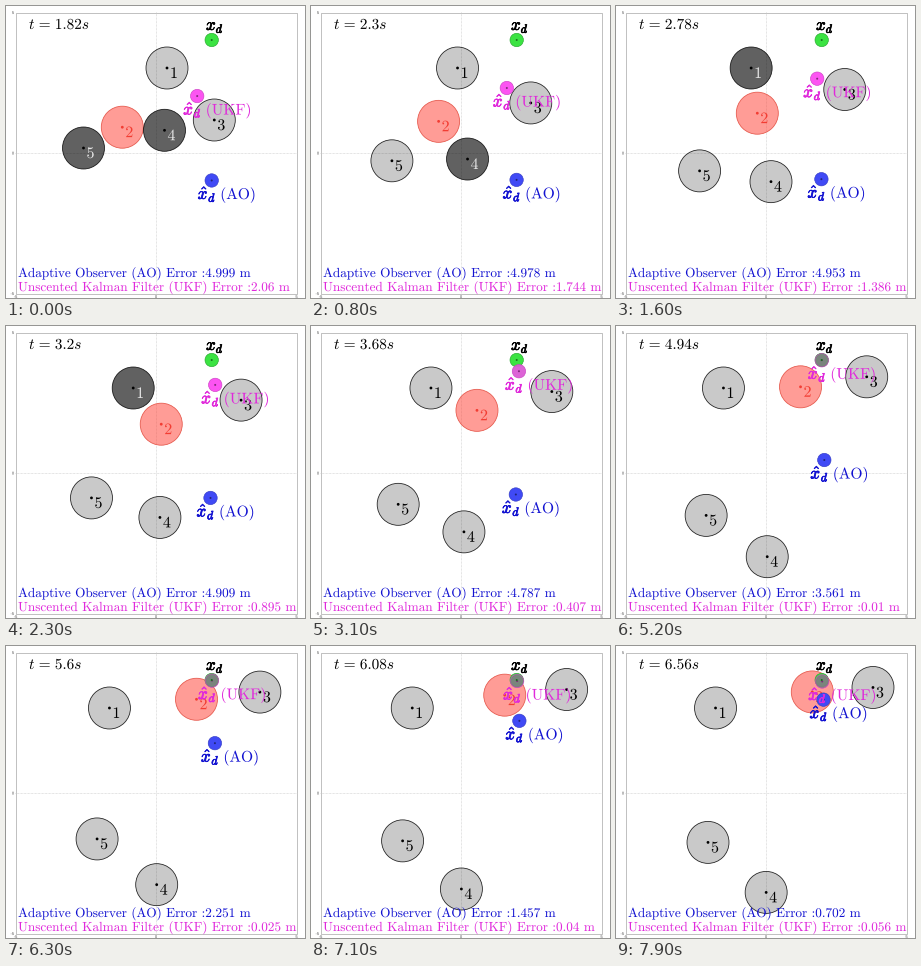
Recreate the animation shown at these times as a matplotlib script. Size 299 by 292 pixels, loop 8000 ms.

```python
import numpy as np
import matplotlib.pyplot as plt
from matplotlib.animation import FuncAnimation
from matplotlib.patches import Circle, Rectangle
from matplotlib.patheffects import Normal, withStroke

W, H, DPI = 299, 292, 64
PT = 72 / DPI            # points per pixel
UNIT = 28.1              # pixels per metre
RATE = 0.03              # approach rate per step
FRAMES = 80
TARGET = np.array([205.7, 34.0])
SENSE = 51               # avoidance range in pixels

GREEN, BLUE, MAGENTA = (0.23, 0.89, 0.26), (0.25, 0.29, 0.96), (0.99, 0.33, 0.95)
BLUE_INK, MAGENTA_INK, RED = (0.07, 0.07, 0.82), (0.88, 0.16, 0.86), (0.95, 0.24, 0.2)

plt.rcParams["mathtext.fontset"] = "cm"
fig = plt.figure(figsize=(W / DPI, H / DPI), dpi=DPI, facecolor="white")
ax = fig.add_axes([0, 0, 1, 1])
ax.set(xlim=(0, W), ylim=(H, 0))
ax.axis("off")


def write(x, y, s, size, color="black", bold=False, z=6, **kw):
    fx = withStroke(linewidth=0.7 * PT, foreground=color) if bold else Normal()
    return ax.text(x, y, s, fontsize=size * PT, color=color, zorder=z,
                   va="baseline", path_effects=[fx], **kw)


def disc(r, face, edge, lw, z):
    return ax.add_patch(Circle((0, 0), r, fc=face, ec=edge, lw=lw * PT, zorder=z))


def roman(s):
    return r"$\text{%s}$" % s


def pchip(i, xs, ys):
    """Monotone cubic interpolation."""
    xs, ys = np.asarray(xs, float), np.asarray(ys, float)
    h = np.diff(xs)
    d = np.diff(ys) / h
    m = np.concatenate([d[:1], np.zeros(len(d) - 1), d[-1:]])
    for k in range(1, len(d)):
        if d[k - 1] * d[k] > 0:
            m[k] = 2 * d[k - 1] * d[k] / (d[k - 1] + d[k])
    k = int(np.clip(np.searchsorted(xs, i, "right") - 1, 0, len(h) - 1))
    u = (i - xs[k]) / h[k]
    return ((1 + 2 * u) * (1 - u) ** 2 * ys[k] + u * (1 - u) ** 2 * h[k] * m[k]
            + u * u * (3 - 2 * u) * ys[k + 1] + u * u * (u - 1) * h[k] * m[k + 1])


class Robot:
    def __init__(self, name):
        self.body = disc(21, "none", "black", 0.8, 2)
        self.dot = disc(1.4, "black", "none", 0, 3)
        self.label = write(0, 0, f"${name}$", 16, z=4)

    def place(self, pos, face, edge, ink, core="black"):
        self.body.set(center=pos, facecolor=face, edgecolor=edge)
        self.dot.set(center=pos, facecolor=core)
        self.label.set_position((pos[0] + 3, pos[1] + 10))
        self.label.set_color(ink)


class Estimate:
    """Marker of an estimated target position with its label."""
    def __init__(self, tag, color, ink, z):
        self.disc = disc(6.7, color, tuple(0.8 * c for c in color), 0.6, z)
        self.dot = disc(1, tuple(0.5 * c for c in color), "none", 0, z + 0.1)
        self.hat = write(0, 0, r"$\hat{x}_d$", 17, ink, bold=True, z=7)
        self.tag = write(0, 0, roman(f"({tag})"), 15.5, ink, z=7)

    def place(self, pos):
        x, y = pos
        self.disc.center = self.dot.center = pos
        self.hat.set_position((x - 14, y + 18.5))
        self.tag.set_position((x + 8.5, y + 18.5))


# Axes box, centre lines and tiny tick labels
ax.add_patch(Rectangle((9.5, 6.5), 281, 281, fc="none", ec="0.6", lw=0.6 * PT, zorder=1))
for xs, ys in (([149.5, 149.5], [6, 288]), ([9, 291], [146.5, 146.5])):
    ax.plot(xs, ys, color="0.8", lw=0.7 * PT, ls=(0, (1, 1)), zorder=1)
for v, p in ((-5, 0), (0, 140.5), (5, 281)):
    small = dict(color="0.3", family="Liberation Sans")
    write(8, 289 - p, f"{v}", 4, ha="right", **small)
    write(9.5 + p, 292, f"{v}", 4, ha="center", **small)

disc(6.7, GREEN, (0.15, 0.65, 0.18), 0.6, 5).center = TARGET
write(200, 24, "$x_d$", 17, bold=True, z=7)
robots = {n: Robot(n) for n in range(1, 6)}
ao = Estimate("AO", BLUE, BLUE_INK, 5.6)
ukf = Estimate("UKF", MAGENTA, MAGENTA_INK, 5.3)
disc(1, (0.1, 0.45, 0.12), "none", 0, 5.8).center = TARGET
clock = write(23, 23, "", 15.2)
ao_line = write(12, 271, "", 13.2, BLUE_INK)
ukf_line = write(12, 285, "", 13.2, MAGENTA_INK)

# start and goal of the robots that simply converge
PATHS = {1: ((161, 62), (93.2, 62)), 3: ((208.3, 114), (262, 34)),
         4: ((158.5, 124.3), (149.3, 259)), 5: ((77.5, 142), (93.5, 202))}

KEYS = [0, 16, 23, 40, 52, 63, 79]
AO_ERR = [4.999, 4.953, 4.909, 4.538, 3.561, 2.251, 0.702]
AO_DX = [0, -0.3, -1.2, 0, 2.6, 3.2, 1.8]
UKF_ERR = [2.06, 1.386, 0.895, 0.069, 0.01, 0.025, 0.056]
UKF_DX = [-14.5, -4.5, 3.5, 0.5, 0.1, 0.3, 0.5]


def chaser(i):
    """Detour around the others first, then straight decay to the target."""
    if i <= 23:
        bend = i * (i - 16)
        return np.array([116.3 + 1.5625 * i + 0.0187 * bend,
                         121.2 - 0.875 * i - 0.0179 * bend])
    return TARGET + np.array([-50.5, 64]) * np.exp(-RATE * (i - 23))


def estimate(i, errs, dxs):
    err, dx = pchip(i, KEYS, errs), pchip(i, KEYS, dxs)
    dy = np.sqrt(max((err * UNIT) ** 2 - dx ** 2, 0))
    return err, TARGET + np.array([dx, dy])


def update(i):
    hunter = chaser(i)
    robots[2].place(hunter, (1, 0.23, 0.18, 0.5), (0.9, 0.35, 0.3), RED, RED)
    for n, (start, goal) in PATHS.items():
        start, goal = np.array(start), np.array(goal)
        pos = goal + (start - goal) * np.exp(-RATE * i)
        close = np.hypot(*(pos - hunter)) < SENSE
        robots[n].place(pos, (0, 0, 0, 0.62 if close else 0.21), (0, 0, 0, 0.85),
                        "0.9" if close else "black")

    err, pos = estimate(i, AO_ERR, AO_DX)
    ao.place(pos)
    ao_line.set_text(roman(f"Adaptive Observer (AO) Error :{round(err, 3):g} m"))

    err, pos = estimate(i, UKF_ERR, UKF_DX)
    ukf.place(pos)
    near = np.clip(1.3 - err / 0.4, 0, 1)
    tint = np.array(MAGENTA) * (1 - near) + np.array([0.52, 0.46, 0.53]) * near
    ukf.disc.set_facecolor((*tint, 1 - 0.15 * near))
    ukf_line.set_text(roman(f"Unscented Kalman Filter (UKF) Error :{round(err, 3):g} m"))

    t = round(1.82 + 0.06 * i, 2)
    clock.set_text(rf"$t\hspace{{0.12}}=\hspace{{0.12}}{t:g}s$")
    return []


anim = FuncAnimation(fig, update, frames=FRAMES, init_func=lambda: [],
                     interval=100, repeat=True, repeat_delay=0)
plt.show()
```
